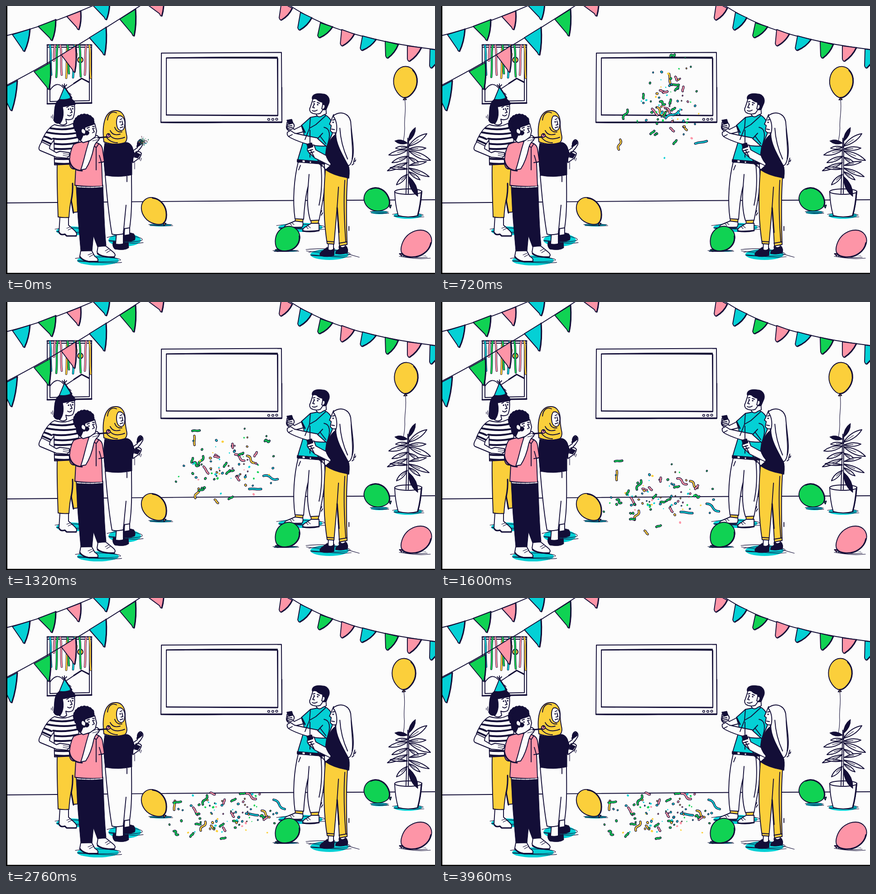
These frames come from a looping animation (947 by 592 pixels, 4000 ms). An HTML page:

```html
<!DOCTYPE html>
<html lang="en">
<head>
<meta charset="utf-8">
<title>Office party</title>
<style>
html, body { margin: 0; width: 100%; height: 100%; overflow: hidden; background: #fcfcfc; }
svg { display: block; width: 100vw; height: 100vh; }
svg * { stroke-linecap: round; stroke-linejoin: round; }
.line { fill: none; stroke: #130e37; stroke-width: 1.9; }
.thin { stroke-width: 1.1; }
.bold { stroke-width: 3; }
.w, .c, .g, .p, .y { stroke: #130e37; stroke-width: 1.9; }
.w { fill: #fcfcfc; } .c { fill: #04d0d5; } .g { fill: #10d253; }
.p { fill: #fd95a7; } .y { fill: #fbcf3b; }
.k { fill: #130e37; stroke: #130e37; stroke-width: 1; }
.flat { stroke: none; }
</style>
</head>
<body>
<svg viewBox="0 0 947 592" preserveAspectRatio="none">
<defs>
  <clipPath id="shirt"><path d="M107 262Q130 270 150 258L161 275L160 325L150 349L107 351L106 296L96 310L78 300Q90 270 107 262Z"/></clipPath>
</defs>

<!-- wall and floor -->
<path class="line" d="M3 435C200 433 330 432 560 430S830 429 947 428"/>
<g id="window">
  <path class="line" d="M91 86L189 86L189 215L91 216ZM97 92V211L184 209V92M91 91H189"/>
  <path class="line bold" d="M91 86H189M91 216L189 214"/>
  <path class="line" d="M97 186C107 171 117 169 128 182M134 182L167 160L183 169"/>
  <path class="line bold" d="M150 171L167 160L183 168"/>
  <circle class="y" cx="164" cy="119" r="6"/>
</g>
<g id="screen">
  <path class="line" d="M343 104L608 102.500L609 257L342 257ZM354 115L599 113L600 242L354 241Z"/>
  <path class="k" d="M354 114Q480 112 599 112.500L599 116Q470 115 354 115ZM342 256L609 255.500L609 258L480 258Q400 259 342 258ZM354 240L600 241V243Q470 242 354 241.500Z"/>
  <path class="line" d="M609 180V256M600 116V241"/>
  <g class="line thin" style="stroke-width:1.600"><circle cx="580" cy="250.500" r="2.300"/><circle cx="589" cy="250.500" r="2.300"/><circle cx="597.500" cy="250" r="2.300"/></g>
</g>
<g id="bunting">
  <path class="line" d="M3 65Q95 42 197 -3M3 174Q110 120 300 -3M628 0Q700 47 800 70Q870 87 947 96"/>
</g>

<g id="shadows"></g>

<!-- woman in a party hat -->
<g>
  <path class="w" d="M119 466L117 499Q119 507 130 504L133 508H154Q160 503 148 493L138 484V466Z"/>
  <path class="line bold" d="M118 501Q121 507 130 504L134 508H155"/>
  <path class="line thin" d="M134 491L142 488M137 495L145 491"/>
  <path class="y" d="M113 349L155 347L158 455L148 456L144 427Q140 446 139 467Q126 468 115 466C114 430 112 390 113 349Z"/>
  <path class="line bold" d="M147 392Q148 410 144 430L149 457"/>
  <path class="w" d="M107 262Q130 270 150 258L161 275L160 325L150 349L107 351L106 296L96 310L78 300Q90 270 107 262Z"/>
  <g clip-path="url(#shirt)"><path class="line" style="stroke-width:4" d="M98 270Q130 276 160 267M90 279Q130 287 162 279M84 288Q92 290 100 294M104 293Q130 297 162 289M80 296L98 304M104 304Q130 308 162 301M104 315Q130 318 162 312M104 326Q130 331 162 324M104 337Q130 340 162 336M104 347Q130 351 162 346"/></g>
  <path class="w" d="M79 300C74 307 70 316 75 319L111 334L134 336Q142 332 140 324L119 321L111 324L96 315L97 309Z"/>
  <path class="line thin" d="M126 326L140 328M126 330L138 332"/>
  <path class="w" d="M123 218L151 216Q153 240 147 249Q140 253 132 250L134 259Q127 266 118 260Z"/>
  <path class="k" d="M105 252C108 236 104 214 118 206C134 199 153 204 153 218L125 223C128 236 127 250 120 259Q108 262 105 252Z"/>
  <path class="c" d="M129 179L117 208Q132 210 145 203Z"/>
  <path class="line bold" d="M130 180L145 203M118 207Q133 209 145 203"/>
  <path class="line" d="M129 179L124 174M129 179V172M129 179L134 174M134 224L138 222M145 222L149 222M142 226L146 235L142 236M136 241Q141 245 145 240"/>
  <circle class="k" cx="138" cy="228" r="1.200"/><circle class="k" cx="147" cy="227" r="1.200"/>
  <path class="line thin" d="M140 192L144 196M141 201L146 206M103 240V249M100 243V247M112 250Q116 246 117 240"/>
</g>

<!-- woman in a hijab -->
<g>
  <path class="k" d="M258 501Q270 499 282 503Q287 510 284 517Q270 523 253 519Z"/>
  <path class="k" d="M237 520Q255 524 270 522L271 534Q262 541 240 537Q233 530 237 520Z"/>
  <path class="w" d="M244 500L242 526Q252 528 259 525V500ZM262 488L261 507L273 505V488Z"/>
  <path class="w" d="M219 374L277 371C277 410 279 450 273 490L260 492L259 503Q246 507 234 504C226 460 223 420 219 374Z"/>
  <path class="line" d="M265 440Q262 470 259 503M267 376V388"/>
  <path class="w" d="M280 320L290 313L290 303Q292 296 297 295Q304 298 302 306L297 314L290 322L281 330ZM280 335L287 322Q296 320 299 326Q297 335 290 339L280 346Z"/>
  <path class="k" d="M293 298L300 296L301 304L290 312Q287 311 289 308ZM286 323L297 328L291 336L283 334Z"/>
  <path class="line thin" d="M284 344V360M297 342L299 336M294 340L296 335"/>
  <path class="k" d="M218 303Q240 309 266 301Q278 303 281 318L284 326L278 346L278 373Q248 380 219 374C216 350 214 325 218 303Z"/>
  <path class="y" d="M216 300C212 270 215 232 241 231C258 230 264 246 263 262Q264 275 266 284Q269 296 262 302Q238 309 216 300Z"/>
  <path class="w" d="M248 243C258 240 264 252 262 263Q261 276 253 275C242 272 242 250 248 243Z"/>
  <path class="line" d="M252 251L256 249M256 254L258 262L254 263M252 269L258 267M224 252C226 235 236 232 244 236M230 275Q236 288 252 283M226 282Q238 300 262 290M221 289Q230 302 246 302M240 268Q244 280 256 278"/>
  <circle class="k" cx="252" cy="256" r="1.200"/>
</g>

<!-- boy with a party blower -->
<g>
  <path class="w" d="M165 541L163 552Q165 560 181 564H202Q206 559 196 553L189 540ZM203 531L201 544Q206 551 220 554H239Q244 549 236 543L220 530Z"/>
  <path class="line bold" d="M163 554Q170 563 184 565L203 565M202 547Q212 555 239 555"/>
  <path class="line thin" d="M181 550L190 546M184 554L193 549M219 541L226 537M222 545L230 540"/>
  <path class="k" d="M155 396L214 395C216 440 217 490 221 529L202 532L193 508L190 541L165 541L159 470Z"/>
  <path class="p" d="M149 306Q166 297 190 300Q211 302 213 316L217 343L211 346L213 398Q180 400 152 396L154 360Q140 362 140 344Q141 320 149 306Z"/>
  <path class="line" style="stroke:#fcfcfc;stroke-dasharray:8 2" d="M157 399Q185 402 212 399"/>
  <path class="line bold" d="M140 340Q144 363 168 364"/>
  <path class="line" d="M199 314V362M190 304L199 313L205 304M206 330L211 347M205 346L217 344"/>
  <path class="w" d="M165 362C172 343 176 318 184 297Q190 285 201 286L207 291L204 297Q197 302 194 312Q188 342 176 360Z"/>
  <path class="line thin" d="M188 294L201 290M191 298L204 295"/>
  <path class="w" d="M173 268L196 260L200 276L197 289L186 297L170 302L162 295Z"/>
  <g class="k" id="curls"><path d="M152 262Q150 246 172 243Q196 240 195 261L175 268L173 280L165 298Q154 292 155 280Z"/></g>
  <path class="w" d="M176 276Q169 266 166 274Q165 283 175 283Z"/>
  <path class="line" d="M179 270L184 268M191 266L195 266M191 270L195 278L191 280"/>
  <circle class="k" cx="183" cy="274" r="1.200"/><circle class="k" cx="194" cy="270" r="1"/>
  <path class="line bold" d="M203 291L225 289"/>
  <circle class="p" cx="226" cy="286" r="4"/><path class="line" d="M226 286Q229 283 225 283"/>
</g>

<!-- man in a cyan shirt -->
<g>
  <path class="y" d="M639 466H656L655 480H638ZM673 472H691L688 484H674Z"/>
  <path class="w" d="M638 475L619 483Q612 487 618 489H653Q657 484 655 477ZM674 480L658 490Q652 495 659 498L691 496V480Z"/>
  <path class="line bold" d="M616 488Q630 490 652 489M655 497Q674 500 691 496"/>
  <path class="line thin" d="M631 479L636 483M627 481L631 485M667 486L672 490M663 488L667 492"/>
  <path class="w" d="M645 345C636 380 632 430 638 470L657 471C659 440 662 415 667 398C664 430 666 455 672 474L691 473C700 430 708 390 702 345Z"/>
  <path class="line" d="M667 398L669 372M695 350Q700 400 691 440M650 352L646 362M694 458L697 452M696 462L699 457"/>
  <path class="w" d="M656 263L636 273L630 263L620 261Q617 270 622 274L636 283L660 277Z"/>
  <path class="c" d="M672 246L704 240C718 248 725 262 720 283L708 310L703 346L644 340C652 310 662 290 656 277L652 264Z"/>
  <path class="k" d="M643 339L704 344V350L643 345Z"/>
  <path class="w" style="stroke-width:1.200" d="M654 340L660 341V346L654 345ZM670 343H674V347H670Z"/>
  <path class="w" d="M707 309C690 311 660 307 628 291Q619 287 621 279L628 275L637 281L660 286L690 292Z"/>
  <path class="c" d="M702 268C715 270 718 285 708 311L688 293L699 281"/>
  <path class="line" d="M672 246L670 270L660 295M670 270L684 262L706 242M671 274V334M693 287L706 304"/>
  <path class="line bold" d="M653 265L660 279"/>
  <path class="w" d="M622 263Q618 257 622 256L633 258Q639 264 634 270Q627 276 620 271Z"/>
  <path class="k" d="M620 252L631 250L634 259L624 262Z"/>
  <path class="line" d="M622 266L631 264M622 270L632 268M624 288L632 284"/>
  <path class="w" d="M684 230L685 240Q690 249 700 241L707 238L706 220Z"/>
  <path class="w" d="M678 204L672 223Q668 229 673 235Q683 241 694 237L703 224L700 208Z"/>
  <path class="k" d="M676 206C673 194 688 192 698 194C713 194 716 208 713 215L707 229L701 230L698 213Q688 211 684 204Z"/>
  <path class="w" d="M699 218Q705 216 704 224Q701 230 697 227Z"/>
  <path class="line" d="M678 212L682 211M687 213L692 215M681 216L677 224L681 225M676 231Q681 234 687 230"/>
  <circle class="k" cx="680" cy="216" r="1.100"/><circle class="k" cx="688" cy="218" r="1.200"/>
</g>

<!-- woman with long hair -->
<g>
  <path class="k" d="M709 533L725 535L724 551Q710 556 694 552Q690 546 698 541ZM735 531H752Q756 538 754 545Q742 550 727 547Q727 541 735 537Z"/>
  <path class="w" d="M712 520L711 538Q717 542 723 537V520ZM738 518V532Q744 536 749 531V518Z"/>
  <path class="y" d="M705 361Q730 374 754 378Q750 430 753 527L736 530L731 444L724 526L709 525C700 470 701 410 705 361Z"/>
  <path class="line" d="M731 444L734 400M748 385Q744 440 750 520M709 520L724 521M735 524L753 521M757 487V496"/>
  <path class="line bold" d="M731 446L735 500"/>
  <path class="w" d="M708 331L684 318L680 307L668 309Q662 316 668 323L682 336L716 353L719 343Z"/>
  <path class="k" d="M664 305L675 302L678 311L667 315Z"/>
  <path class="line" d="M667 320L677 317M669 325L680 322M672 318L680 333M690 347L697 354M688 340L706 362"/>
  <path class="w" d="M723 240L718 252L714 261L718 264L716 275Q720 282 728 280L724 293L736 291L744 260Z"/>
  <path class="k" d="M725 285C712 296 705 318 707 333Q711 343 718 350L705 362Q722 374 750 379L757 381Q760 360 755 350L741 300Z"/>
  <path class="w" d="M722 243C736 231 757 235 761 256C763 288 771 320 764 340Q760 354 755 352C740 325 728 303 728 283C733 268 729 251 722 243Z"/>
  <path class="line" d="M737 270Q739 305 754 338M762 270C763 300 767 320 764 338M721 252L725 251M719 272L725 273M767 346L770 336M764 351L768 348M770 344L772 340"/>
  <circle class="k" cx="722" cy="257" r="1.200"/>
</g>

<!-- floating balloon, plant, floor balloons -->
<g id="float"><path class="line thin" d="M880 205C884 235 878 245 880 270Q880 285 877 300"/></g>
<g id="plant">
  <path class="w" d="M858 410L918 409Q916 440 909 463Q888 469 866 463Q859 440 858 410Z"/>
  <ellipse class="w" cx="888" cy="410" rx="30" ry="6"/>
  <path class="line" d="M883 414Q885 360 887 292M888 414Q889 360 889 300"/>
  <path class="line bold" d="M917 412Q915 440 909 462"/>
</g>
<g id="balloons"></g>
<g id="confetti"></g>

<path fill="#000" d="M0 0H3V589.500H947V592H0Z"/>
</svg>
<script>
const NS = 'http://www.w3.org/2000/svg', INK = '#130e37';
const LOOP = 4000, TAU = Math.PI * 2;
const FILL = { c: '#04d0d5', g: '#10d253', p: '#fd95a7', y: '#fbcf3b' };
const $ = id => document.getElementById(id);

function add(parent, tag, attrs) {
  const el = document.createElementNS(NS, tag);
  for (const k in attrs) el.setAttribute(k, attrs[k]);
  parent.appendChild(el);
  return el;
}
const path = (parent, cls, d) => add(parent, 'path', { class: cls, d });

let seed = 11;
function rnd() {
  seed = (seed * 16807) % 2147483647;
  return seed / 2147483647;
}
const gauss = () => rnd() + rnd() + rnd() + rnd() - 2;

// Ribbons over the window: colour, x, bottom
[['c', 99, 152], ['g', 112, 157], ['p', 122, 152], ['y', 134, 159], ['g', 138, 149], ['c', 149, 158],
 ['g', 164, 156], ['p', 175, 152], ['y', 186, 159], ['p', 106, 120], ['y', 155, 106]].forEach(([c, x, b], i) => {
  const s = i % 2 ? 2 : -2;
  const d = `M${x + s} 87C${x - s} 105 ${x + s} 125 ${x - s / 2} ${b}`;
  add($('window'), 'path', { d, fill: 'none', stroke: INK, 'stroke-width': 4.6 });
  add($('window'), 'path', { d, fill: 'none', stroke: FILL[c], 'stroke-width': 3 });
});

// Flags: two rope points and the tip
[['c', 14, 63, 53, 51, 41, 100], ['g', 71, 45, 110, 30, 102, 76], ['p', 134, 23, 165, 11, 161, 52],
 ['c', 192, -1, 229, -15, 222, 30], ['c', -12, 184, 25, 165, 13, 231], ['g', 62, 145, 98, 125, 95, 184],
 ['p', 122, 108, 154, 88, 152, 146], ['c', 184, 70, 221, 47, 218, 108], ['g', 251, 29, 286, 7, 283, 66],
 ['p', 312, -3, 348, -25, 344, 22], ['p', 608, -8, 632, 5, 608, 31], ['c', 650, 14, 675, 26, 649, 53],
 ['g', 694, 37, 721, 46, 693, 70], ['p', 741, 52, 769, 62, 743, 88], ['c', 787, 66, 817, 74, 787, 98],
 ['g', 837, 78, 866, 85, 843, 115], ['p', 886, 88, 917, 92, 891, 122], ['c', 936, 95, 965, 99, 940, 137]
].forEach(([c, ax, ay, bx, by, x, y], i) => {
  const right = `Q${(bx + x) / 2 + 4} ${(by + y) / 2 + 4} ${x} ${y}`;
  path($('bunting'), c, `M${ax} ${ay}L${bx} ${by}${right}Q${x - 3} ${y + 1} ${x - 5} ${y - 5}Z`);
  path($('bunting'), 'line bold', `M${bx} ${by}${right}`);
});

// Shadows with a loose scribble
[[145, 497, 37, 10], [203, 562, 50, 11], [262, 517, 39, 14], [650, 489, 53, 10], [714, 549, 46, 12],
 [341, 484, 26, 3], [617, 541, 28, 2], [824, 456, 20, 4], [887, 463, 34, 7], [901, 553, 26, 1.500]].forEach(([x, y, a, b]) => {
  add($('shadows'), 'ellipse', { cx: x, cy: y, rx: a * .92, ry: b, fill: FILL.c });
  path($('shadows'), 'line thin', `M${x - a} ${y - b * .4}C${x - a * .3} ${y - b} ${x + a} ${y - b * .6} ${x + a} ${y - 1}` +
    `S${x - a} ${y + b * .3} ${x - a * .9} ${y + 1}S${x + a * .3} ${y + b * .8} ${x + a * 1.05} ${y + b * .4}`);
});
path($('shadows'), 'line thin', 'M662 538Q720 532 745 545L780 555M663 541L700 546');
add($('shadows'), 'ellipse', { cx: 905, cy: 554, rx: 26, ry: 3, fill: '#fcfcfc' });
path($('shadows'), 'line thin', 'M868 553Q890 557 930 555M880 555Q910 560 937 557');

for (let i = 0; i < 15; i++) {
  const a = 1.3 + i * .31;
  add($('curls'), 'circle', { cx: 173 + 20 * Math.cos(a), cy: 262 + 19 * Math.sin(a), r: 5 });
}

// Egg with a knot below, turned by rot degrees
function balloon(parent, c, x, y, a, b, rot) {
  const g = add(parent, 'g', { transform: `translate(${x} ${y}) rotate(${rot})` });
  path(g, c, `M-3 ${b + 5}L0 ${b}L4 ${b + 4}Z`);
  path(g, c, `M0 ${-b}C${a * .6} ${-b} ${a} ${-b * .55} ${a} ${-b * .05}C${a} ${b * .5} ${a * .4} ${b} 0 ${b}` +
    `C${-a * .4} ${b} ${-a} ${b * .5} ${-a} ${-b * .05}C${-a} ${-b * .55} ${-a * .6} ${-b} 0 ${-b}Z`);
  path(g, 'line bold', `M${a * .6} ${-b * .78}Q${a} ${-b * .5} ${a} ${-b * .05}C${a} ${b * .5} ${a * .4} ${b} 0 ${b}`);
}
balloon($('float'), 'y', 881, 168, 26, 34.500, 2);
balloon($('balloons'), 'y', 327.500, 453.500, 25, 33, -38);
balloon($('balloons'), 'g', 819, 428, 25, 29.500, -63);
balloon($('balloons'), 'g', 620.500, 515, 25.500, 30, 43);
balloon($('balloons'), 'p', 905, 526, 27, 37, 56);

// Leaves: root, tip, half width, solid
[[887, 318, 845, 329, 7], [887, 332, 852, 346, 6], [886, 346, 842, 364, 6], [886, 372, 862, 395, 6],
 [888, 310, 929, 282, 8], [889, 316, 927, 314, 6], [889, 320, 937, 341, 8], [889, 334, 914, 349, 5],
 [890, 352, 928, 344, 5], [889, 358, 934, 377, 6], [887, 312, 860, 314, 5], [886, 360, 848, 357, 4],
 [889, 366, 914, 384, 5], [887, 303, 858, 298, 7, 1], [888, 300, 904, 268, 7, 1], [888, 375, 909, 421, 10, 1]
].forEach(([x, y, u, v, w, solid]) => {
  const n = Math.hypot(u - x, v - y), px = (y - v) / n * w * 1.3, py = (u - x) / n * w * 1.3;
  const mx = x + (u - x) * .55, my = y + (v - y) * .55;
  path($('plant'), solid ? 'k' : 'w', `M${x} ${y}Q${mx + px} ${my + py} ${u} ${v}Q${mx - px} ${my - py} ${x} ${y}Z`);
  if (!solid) path($('plant'), 'line thin', `M${x} ${y}L${mx} ${my}`);
});

// Confetti: each piece has four waypoints after the burst
const pieces = [];
function piece(pts, a0, a1, draw) {
  const el = add($('confetti'), 'g', {});
  draw(el);
  const [, , , , , y2, , y3] = pts;
  const land = 1600 + Math.min(600, Math.max(120, Math.abs(y3 - y2) / .2));
  pieces.push({ el, a0, a1, pts, times: [720, 1040, 1600, land], sx: 301 + gauss() * 7, sy: 299 + gauss() * 7 });
}
function strip(half, bend, color) {
  return g => {
    const d = `M${-half} 0Q${-half / 2} ${-bend} 0 0T${half} 0`;
    add(g, 'path', { d, fill: 'none', stroke: INK, 'stroke-width': 5.2 });
    add(g, 'path', { d, fill: 'none', stroke: color, 'stroke-width': 2.8 });
  };
}

// Long strips: waypoints, start and end angle, half length
[['y', 505, 160, 444, 228, 388, 383, 372, 458, 84, 95, 10],
 ['g', 517, 174, 447, 217, 392, 351, 378, 451, 0, -8, 8],
 ['g', 511, 109, 588, 184, 565, 429, 567, 483, -25, 15, 5],
 ['g', 407, 239, 424, 297, 437, 404, 439, 446, -65, -65, 11],
 ['y', 394, 306, 411, 374, 432, 471, 435, 504, -82, -62, 11],
 ['c', 574, 301, 558, 361, 542, 465, 543, 478, -12, 8, 13],
 ['p', 472, 234, 459, 302, 424, 440, 418, 471, 50, 60, 9],
 ['y', 483, 232, 522, 292, 558, 403, 573, 477, 50, 40, 11],
 ['p', 504, 233, 500, 291, 532, 396, 541, 438, 40, 30, 12],
 ['c', 510, 240, 568, 321, 600, 454, 603, 456, -28, 40, 16],
 ['y', 539, 270, 476, 371, 453, 509, 456, 507, 45, 50, 5],
 ['p', 510, 273, 515, 320, 508, 459, 500, 479, 42, 58, 5],
 ['g', 489, 214, 446, 276, 393, 440, 375, 519, 30, 40, 6]
].forEach(([c, ...n], i) => piece(n.slice(0, 8), n[8], n[9], strip(n[10], i % 5 > 1 ? 5 : 1, FILL[c])));

// Small bits, scattered by rule
for (let i = 0; i < 88; i++) {
  const color = FILL['gcpygc'[i % 6]], gx = gauss(), gy = gauss();
  const x3 = 488 + gx * 100 + gauss() * 35, y3 = 478 + gauss() * 38;
  const y2 = Math.min(y3 - 10, 436 + gy * 55), x2 = x3 + gauss() * 12;
  const pts = [503 + gx * 58, 220 + gy * 75, 492 + gx * 85, 297 + gy * 68, x2, y2, x3, Math.max(432, y3)];
  const size = 1 + rnd() * 1.4, a = rnd() * 180;
  if (i % 8 === 0) piece(pts, a, a + 40, strip(3 + size, 1, color));
  else piece(pts, a, a + 60, g => add(g, 'ellipse', {
    rx: size * 1.2, ry: size, fill: color, stroke: INK, 'stroke-width': i % 5 < 3 ? 1.1 : 0
  }));
}

const mix = (a, b, u) => a + (b - a) * u;

function pose(p, t) {
  const { pts, times } = p;
  if (t < 720) {
    const u = t / 720, e = 1 - (1 - u) ** 3;
    return [mix(p.sx, pts[0], e), mix(p.sy, pts[1], e) - 120 * u * (1 - u), mix(.22, 1, Math.min(1, u * 3))];
  }
  let k = 0;
  while (k < 2 && t > times[k + 1]) k++;
  const u = Math.min(1, (t - times[k]) / (times[k + 1] - times[k])), j = k * 2;
  return [mix(pts[j], pts[j + 2], u), mix(pts[j + 1], pts[j + 3], u), 1];
}

function render(t) {
  const sway = 1.22 * Math.sin(TAU * (t + 100) / LOOP);
  $('float').setAttribute('transform', `rotate(${sway} 879 300)`);
  for (const p of pieces) {
    const [x, y, s] = pose(p, t);
    const a = mix(p.a0, p.a1, Math.min(1, Math.max(0, (t - 720) / (p.times[3] - 720))));
    p.el.setAttribute('transform', `translate(${x.toFixed(2)} ${y.toFixed(2)}) rotate(${a.toFixed(1)}) scale(${s.toFixed(3)})`);
  }
}

const start = performance.now();
function tick() {
  render((performance.now() - start) % LOOP);
  requestAnimationFrame(tick);
}
render(0);
requestAnimationFrame(tick);
</script>
</body>
</html>
```
